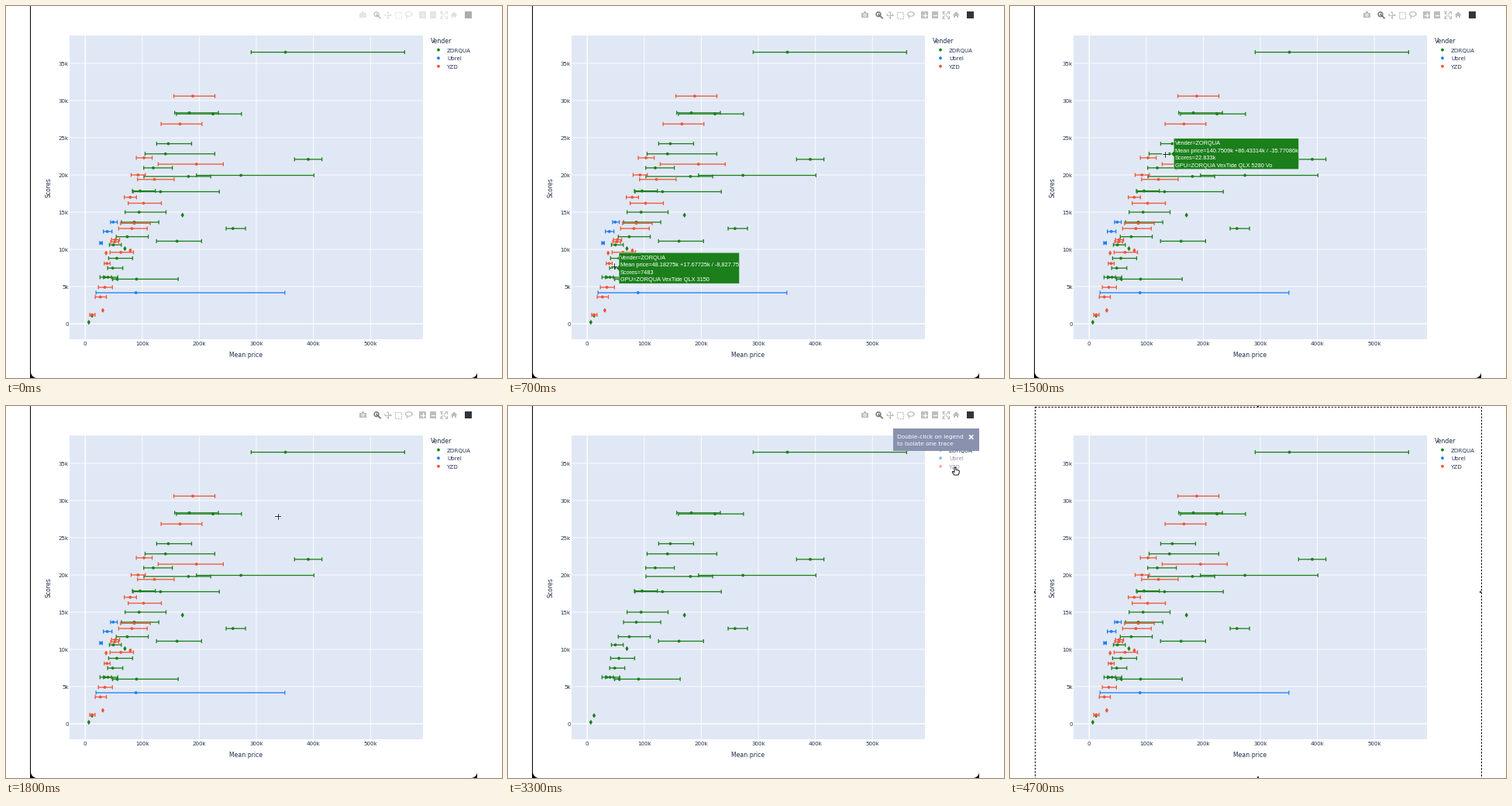
Animation of 640 by 480 pixels, one loop 4800 ms. Source, as a matplotlib script:

```python
import numpy as np
import matplotlib.pyplot as plt
from matplotlib.animation import FuncAnimation
from matplotlib.patches import Circle, Polygon, Rectangle

W, H, DPI = 640, 480, 100
STEP, LOOP = 100, 4800
PT = 72 / DPI
INK = "#22314f"
GREEN, BLUE, RED = "#1b7f1b", "#1f7cf0", "#f0553a"

fig = plt.figure(figsize=(W / DPI, H / DPI), dpi=DPI, facecolor="white")
ax = fig.add_axes([0, 0, 1, 1])
ax.set_xlim(0, W)
ax.set_ylim(H, 0)
ax.axis("off")


def px(price):
    return 102.2 + 0.736 * price


def py(score):
    return 410 - 9.6 * score


def line(xs, ys, color, width, z, **kw):
    return ax.plot(xs, ys, color=color, lw=width * PT, zorder=z, **kw)[0]


def rect(x0, y0, x1, y1, z, fill="none", edge="none", width=1, **kw):
    return ax.add_patch(Rectangle((x0, y0), x1 - x0, y1 - y0, fc=fill, ec=edge,
                                  lw=width * PT, zorder=z, **kw))


def dot(x, y, r, z, fill, edge="none", width=1):
    return ax.add_patch(Circle((x, y), r, fc=fill, ec=edge, lw=width * PT,
                               zorder=z))


def poly(pts, z, fill, edge="none", width=1):
    return ax.add_patch(Polygon(pts, fc=fill, ec=edge, lw=width * PT, zorder=z))


def label(x, y, s, size, z=3, color=INK, ha="left", font="DejaVu Sans"):
    return ax.text(x, y + 0.36 * size, s, fontsize=size * PT, color=color,
                   ha=ha, va="baseline", family=font, zorder=z)


def show(items, on):
    for a in items:
        a.set_visible(on)


def fade(items, level):
    for a in items:
        a.set_alpha(level)
        a.set_visible(level > 0)


# Cards are (mean price, minus, plus, score), all in thousands.
def series(scores, price, minus, plus):
    """Cards whose price follows the score, with proportional error bars."""
    s = np.array(scores)
    m = price(s)
    return list(zip(m, m * minus, m * plus, s))


Z3150 = (48.18275, 8.82775, 17.67725, 7.483)
Z5280 = (140.7509, 35.77086, 86.43314, 22.833)
K540 = (49.04, 4.49, 7.192, 13.662)


def zorqua_cards():
    odd = [(351, 60, 209, 36.5), (224, 64, 50, 28.2), (391, 24, 24, 22.1),
           (273, 78, 128, 19.95), (181, 78, 39, 19.8), (132, 48, 103, 17.75),
           (259, 12, 22, 12.8), (161, 36, 43, 11.1), (90, 42, 73, 6),
           (56, 8, 1, 6), (170.5, 0, 0, 14.6)]
    lean = series([10.6, 17.85, 20.95, 24.2, 28.35],
                  lambda s: 3.6 * s + 0.1 * s * s, 0.14, 0.28)
    wide = series([5.4, 6.25, 8.8, 11.7, 13.65, 15],
                  lambda s: 6.3 * s, 0.26, 0.5)
    for i in (0, 1):  # the two cheapest share one height
        wide[i] = (34 + 6 * i, 8, 12 + 5 * i, 6.25)
    exact = series([0.2, 1.1, 10.1], lambda s: 5 + 6.4 * s, 0, 0)
    return odd + lean + wide + exact + [Z3150, Z5280]


def ubrel_cards():
    return [K540, (38.7, 6.8, 8.2, 12.4), (27.9, 2.4, 2.2, 10.85),
            (89, 70, 261, 4.17)]


def yzd_cards():
    tops = np.array([1.2, 3.6, 4.9, 9.6, 12.8, 13.5, 16.2, 19.4, 26.85, 30.6])
    wide = series(tops, lambda s: 5 + 6 * s, 0.36 - 0.006 * tops,
                  0.42 - 0.007 * tops)
    lean = series([8.1, 11, 11.3, 17, 20, 22.3], lambda s: 1.5 + 4.55 * s,
                  0.13, 0.14)
    exact = series([1.8, 9.85], lambda s: 20 + 6 * s, 0, 0.005)
    return wide + lean + exact + [(36.7, 0, 0, 9.5), (195, 67, 47, 21.45)]


def trace(cards, color, z):
    parts = []
    bar = dict(snap=False, solid_capstyle="butt")
    for mean, minus, plus, score in cards:
        y, lo, hi = py(score), px(mean - minus), px(mean + plus)
        parts.append(line([lo, hi], [y, y], color, 1.3, z, **bar))
        for x in (lo, hi):
            parts.append(line([x, x], [y - 2.5, y + 2.5], color, 1.3, z, **bar))
        parts.append(dot(px(mean), y, 1.9, z + 0.05, color))
    return parts


def window():
    """Dark edge with a white sheet whose lower corners are rounded."""
    r, turn = 8, np.linspace(0, np.pi / 2, 12)
    right = [(608 - r + r * np.cos(a), H - r + r * np.sin(a)) for a in turn]
    left = [(32 + r - r * np.sin(a), H - r + r * np.cos(a)) for a in turn]
    return [rect(31, 0, 608, H, 0, "black"),
            poly([(32, 0), (608, 0)] + right + left, 0.1, "white")]


def marquee():
    parts = [rect(31.5, 0.5, 607.5, 479.5, 0.2, edge="black",
                  linestyle=(0, (2.4, 1.8)))]
    for x, y in [(32, 240), (320, 1), (320, 479), (607, 240)]:
        parts.append(rect(x - 1.2, y - 1.2, x + 1.2, y + 1.2, 0.3, "#333333"))
    return parts


def chart():
    x0, y0, x1, y1 = 81.5, 38, 537.5, 430
    rect(x0, y0, x1, y1, 1, "#e0e8f5")
    for i in range(6):
        x = px(100 * i)
        line([x, x], [y0, y1], "white", 0.9 if i else 1.4, 1.1, snap=False)
        label(x, 435, f"{i}00k" if i else "0", 7.2, ha="center")
    for i in range(8):
        y = py(5 * i)
        line([x0, x1], [y, y], "white", 0.9 if i else 1.4, 1.1, snap=False)
        label(80.8, y, f"{5 * i}k" if i else "0", 7.2, ha="right")
    label(309.5, 449.8, "Mean price", 7.8, ha="center")
    ax.text(55, 234, "Scores", fontsize=7.8 * PT, color=INK, rotation=90,
            ha="center", va="center", family="DejaVu Sans", zorder=3)
    label(547.8, 45.5, "Vender", 7.8)


def key(row, name, color):
    y = 57 + 10.6 * row
    return [dot(558, y - 0.4, 1.9, 3, color), label(569, y, name, 7.2)]


def modebar():
    y, c, dark = 11.5, "#bdbdbd", "#777777"
    # camera
    p = [rect(456, 8.5, 465, 15, 5, c), rect(458.7, 7.4, 462.3, 9, 5, c),
         dot(460.5, 11.7, 1.9, 5.1, "white"), dot(460.5, 11.7, 1, 5.2, c)]
    # magnifier
    p += [dot(478, 10.7, 2.9, 5, "white", dark, 1.5),
          line([480.2, 483], [13, 15.6], dark, 1.8, 5),
          line([476.6, 479.4], [10.7, 10.7], dark, 0.9, 5.1),
          line([478, 478], [9.3, 12.1], dark, 0.9, 5.1)]
    # pan
    x = 492.5
    p += [line([x - 4, x + 4], [y, y], c, 1, 5),
          line([x, x], [y - 4, y + 4], c, 1, 5)]
    for dx, dy in [(1, 0), (-1, 0), (0, 1), (0, -1)]:
        bx, by = x + 2.6 * dx, y + 2.6 * dy
        p.append(poly([(x + 4.8 * dx, y + 4.8 * dy),
                       (bx + 1.7 * dy, by + 1.7 * dx),
                       (bx - 1.7 * dy, by - 1.7 * dx)], 5, c))
    # box and lasso
    p.append(rect(502, y - 4, 510, y + 4, 5, edge=c, width=1.2,
                  linestyle=(0, (1.6, 1))))
    a = np.linspace(0, 2 * np.pi, 30)
    p += [line(519.8 + 4.2 * np.cos(a), 10.4 + 2.9 * np.sin(a), c, 1.2, 5),
          line([516.6, 517.6, 517], [12.4, 14, 15.8], c, 1.1, 5)]
    # zoom in and out
    for x in (537.5, 551):
        p += [rect(x - 4.2, y - 4.2, x + 4.2, y + 4.2, 5, c),
              line([x - 2.3, x + 2.3], [y, y], "white", 1.3, 5.1)]
    p.append(line([537.5, 537.5], [y - 2.3, y + 2.3], "white", 1.3, 5.1))
    # autoscale
    for sx in (-1, 1):
        for sy in (-1, 1):
            x, v = 564.7 + 4.2 * sx, y + 4.2 * sy
            p += [line([564.7 + sx, x], [y + sy, v], c, 1.1, 5),
                  line([x - 2.4 * sx, x, x], [v, v, v - 2.4 * sy], c, 1.1, 5)]
    # home
    p += [poly([(573.7, 11.8), (578.2, 7.2), (582.7, 11.8)], 5, c),
          rect(575.1, 11.4, 581.3, 15.4, 5, c),
          rect(577.3, 12.8, 579.1, 15.4, 5.1, "white")]
    p.append(rect(591.5, 6.5, 601.2, 16, 5, "#33333b"))
    return p


def number(k):
    if k >= 10:
        return f"{k:.7g}k"
    v = round(k * 1000, 2)
    return f"{v:.0f}" if v == int(v) else f"{v:,.2f}"


def tip(card, vendor, model, color, width):
    mean, minus, plus, score = card
    x, y, half = px(mean) + 5.4, py(score), 20
    rows = [f"Vender={vendor}",
            f"Mean price={number(mean)} +{number(plus)} / -{number(minus)}",
            f"Scores={number(score)}", f"GPU={vendor} {model}"]
    body = [(x - 3.6, y), (x, y - 3.6), (x, y - half), (x + width, y - half),
            (x + width, y + half), (x, y + half), (x, y + 3.6)]
    parts = [poly(body, 6, color, "white", 0.5)]
    for i, s in enumerate(rows):
        parts.append(label(x + 1.7, y - 14.1 + 9.5 * i, s, 7.35, 6.1, "white",
                           font="Liberation Sans"))
    return parts


def notice():
    kw = dict(size=7.45, z=7.1, color="white")
    return [rect(496.5, 29, 608, 58.3, 7, "#858eac"),
            label(502, 39.6, "Double-click on legend", **kw),
            label(502, 48.3, "to isolate one trace", **kw),
            line([595.6, 599.8], [38, 42.2], "white", 1.6, 7.1),
            line([595.6, 599.8], [42.2, 38], "white", 1.6, 7.1)]


HAND = np.array([(-1, 0), (0.8, 0), (1, 3.4), (4, 3.7), (5.2, 4.5), (5.2, 7.2),
                 (4, 10), (-1.3, 10), (-3.8, 6.3), (-3, 5.2), (-1, 6.6)])
# Cursor rests: arrive, leave, x, y
STOPS = [(0, 200, 112, 420), (600, 800, 136.5, 335.5), (1000, 1200, 150, 283),
         (1400, 1600, 200, 191), (2100, 2300, 577, 69), (2500, 3600, 577, 79),
         (3800, 4100, 577, 69), (4300, LOOP, 620, 60)]
TIMES = [t for stop in STOPS for t in stop[:2]]
XS, YS = (np.repeat([stop[i] for stop in STOPS], 2) for i in (2, 3))

sheet, ants = window(), marquee()
chart()
traces = [trace(zorqua_cards(), GREEN, 2), trace(ubrel_cards(), BLUE, 2.2),
          trace(yzd_cards(), RED, 2.4)]
keys = [key(0, "ZORQUA", GREEN), key(1, "Ubrel", BLUE), key(2, "YZD", RED)]
bar = modebar()
tips = [(500, 900, tip(Z3150, "ZORQUA", "VexTide QLX 3150", GREEN, 155.6)),
        (900, 1300, tip(K540, "Ubrel", "Fyn K540", BLUE, 113.3)),
        (1400, 1700, tip(Z5280, "ZORQUA", "VexTide QLX 5280 Vo", GREEN, 161.5))]
toast = notice()
cross = [line([0], [0], color, width, 8 + 0.1 * i)
         for i, (color, width) in enumerate([("white", 1.8), ("black", 0.8)])]
hand = poly(HAND, 8, "white", "black", 0.9)


def move_cursor(t):
    x, y = np.interp(t, TIMES, XS), np.interp(t, TIMES, YS)
    live = 200 <= t < 4300
    show(cross, live and 81 < x < 538 and 38 < y < 430)
    for arm in cross:
        arm.set_data([x - 3.5, x + 3.5, np.nan, x, x],
                     [y, y, np.nan, y - 3.5, y + 3.5])
    hand.set_xy(HAND + (x, y))
    hand.set_visible(live and x > 550)


def draw(n):
    t = n * STEP
    last = t >= LOOP - STEP
    show(sheet, not last)
    show(ants, last)
    fade(bar, np.interp(t, [0, 200, 4300, 4500], [0.4, 1, 1, 0]))
    hidden = [False, 2500 <= t < 4100, 2900 <= t < 3700]
    for off, parts, entry in zip(hidden, traces, keys):
        show(parts, not off)
        fade(entry, 0.5 if off else 1)
    for start, end, parts in tips:
        show(parts, start <= t < end)
    fade(toast, np.interp(t, [2400, 2500, 2600, 3500, 3700],
                          [0, 0.55, 0.97, 0.97, 0]))
    move_cursor(t)
    return []


anim = FuncAnimation(fig, draw, frames=LOOP // STEP, interval=STEP,
                     repeat=True, repeat_delay=0, blit=False)
plt.show()
```
